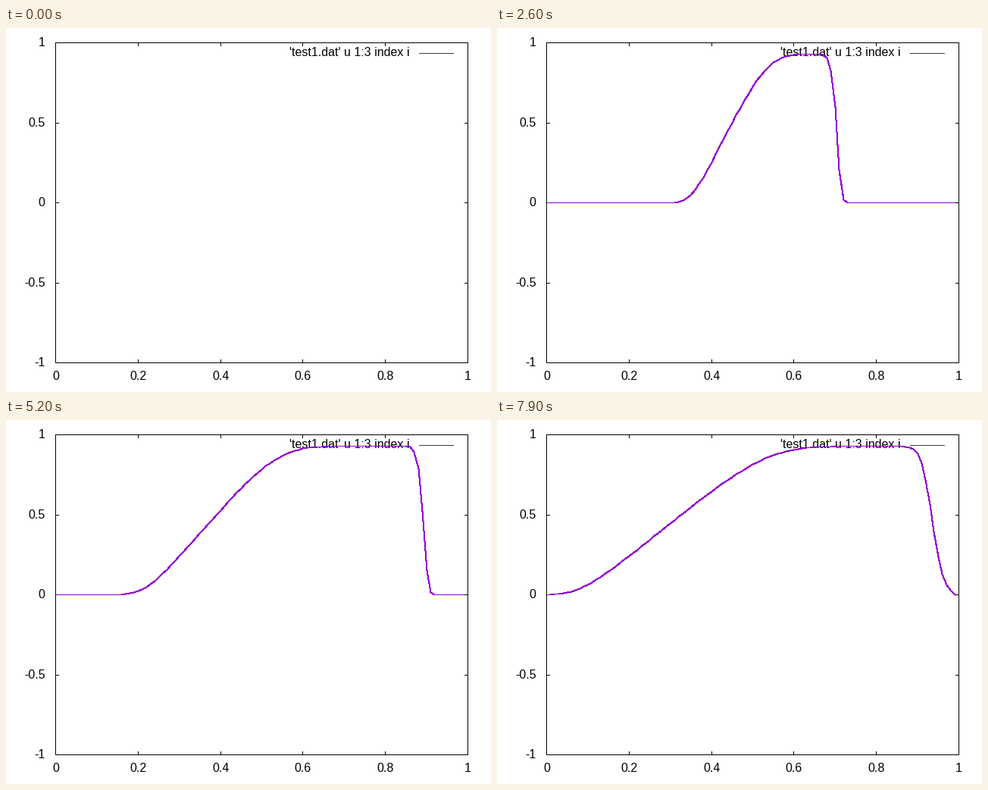
These frames come from a looping animation (640x480 px, 8000 ms). A matplotlib script:

```python
import matplotlib.pyplot as plt
import numpy as np
from matplotlib.animation import FuncAnimation

plt.rcParams["path.simplify"] = False
plt.rcParams["font.family"] = "Liberation Sans"

DPI = 80
PX = 72 / DPI  # one pixel in points
LEFT, RIGHT, TOP, BOTTOM = 65, 609, 19, 441
FRAMES = 80

# Shock tube between two walls, first-order Rusanov scheme
GAMMA, CFL = 1.4, 0.9
N, DX = 100, 0.01


def primitive(U):
    rho, m, E = U
    u = m / rho
    return rho, u, (GAMMA - 1) * (E - 0.5 * rho * u**2)


def conserved(rho, u, p):
    return np.array([rho, rho * u, p / (GAMMA - 1) + 0.5 * rho * u**2])


def step(U):
    rho, u, p = primitive(U)
    speed = np.abs(u) + np.sqrt(GAMMA * p / rho)
    dt = CFL * DX / speed.max()
    F = np.array([rho * u, rho * u**2 + p, (U[2] + p) * u])
    s = np.maximum(speed[:-1], speed[1:])
    flux = 0.5 * (F[:, :-1] + F[:, 1:]) - 0.5 * s * (U[:, 1:] - U[:, :-1])
    new = U.copy()
    new[:, 1:-1] -= dt / DX * (flux[:, 1:] - flux[:, :-1])

    # walls: fluid at rest, density and pressure from the neighbour
    rho, u, p = primitive(new)
    for wall, inner in ((0, 1), (-1, -2)):
        rho[wall], u[wall], p[wall] = rho[inner], 0, p[inner]
    return conserved(rho, u, p)


def solve(count):
    high = np.arange(N) <= N // 2
    U = conserved(np.where(high, 1.0, 0.125), np.zeros(N), np.where(high, 1.0, 0.1))
    profiles = []
    for _ in range(count):
        profiles.append(primitive(U)[1])
        U = step(U)
    return profiles


def px_x(x):
    return np.floor(LEFT + (RIGHT - LEFT) * x + 0.5)


def px_y(y):
    return np.floor((TOP + BOTTOM) / 2 - (BOTTOM - TOP) / 2 * y + 0.5)


fig = plt.figure(figsize=(8, 6), dpi=DPI, facecolor="white")
ax = fig.add_axes([0, 0, 1, 1])
ax.set_xlim(0, 640)
ax.set_ylim(480, 0)
ax.axis("off")


def stroke(xs, ys, color="black", z=1):
    line, = ax.plot(np.asarray(xs) + 0.5, np.asarray(ys) + 0.5, color=color,
                    lw=PX, antialiased=False, snap=False, zorder=z,
                    solid_capstyle="projecting", solid_joinstyle="bevel")
    return line


def label(x, y, text, ha):
    ax.text(x, y, text, ha=ha, va="baseline", fontsize=16 * PX, color="black", zorder=2)


for v in (0, 0.2, 0.4, 0.6, 0.8, 1):
    x = px_x(v)
    stroke([x, x], [TOP, TOP + 4])
    stroke([x, x], [BOTTOM - 4, BOTTOM])
    label(x + 0.5, 464, f"{v:g}", "center")

for v in (-1, -0.5, 0, 0.5, 1):
    y = px_y(v)
    stroke([LEFT, LEFT + 4], [y, y])
    stroke([RIGHT - 4, RIGHT], [y, y])
    label(51.5, y + 5, f"{v:g}", "right")

label(374.5, 37, "'test1.dat' u 1:3 index i", "left")
stroke([545, 590], [33, 33], "#404040")
stroke([LEFT, RIGHT, RIGHT, LEFT, LEFT], [TOP, TOP, BOTTOM, BOTTOM, TOP], z=4)

curve = stroke([], [], "#9400d3", z=3)
nodes = px_x(np.arange(N) * DX) + 0.5
profiles = solve(FRAMES - 1)


def init():
    curve.set_data([], [])
    return curve,


def update(i):
    if i == 0:
        return init()
    curve.set_data(nodes, px_y(profiles[i - 1]) + 0.5)
    return curve,


anim = FuncAnimation(fig, update, frames=FRAMES, init_func=init,
                     interval=100, repeat=True, repeat_delay=0)
plt.show()
```
